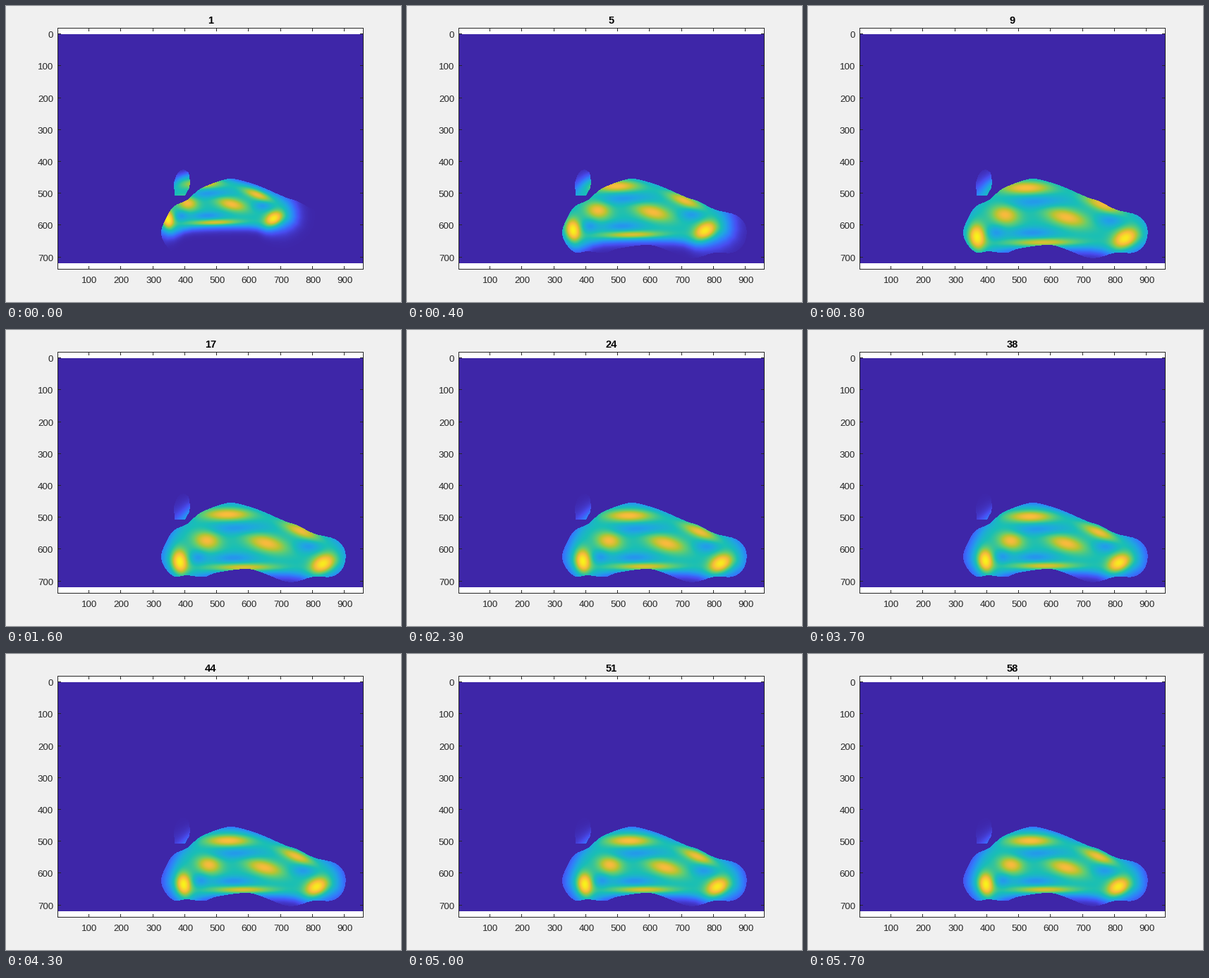
Write a matplotlib script that moves like this. It is 560 px wide and 420 px high and loops after 5800 ms.

```python
import numpy as np
import matplotlib.pyplot as plt
from matplotlib.animation import FuncAnimation
from matplotlib.colors import LinearSegmentedColormap
from matplotlib.path import Path

W, H, DPI = 560, 420, 100
FRAMES, INTERVAL = 58, 100
LEFT, RIGHT, TOP, BOTTOM = 73, 507, 31, 374
IMG_TOP, IMG_BOTTOM = 40, 365
SCALE = (RIGHT - LEFT) / 960
INK = "#262626"

STOPS = np.array([0, 8, 16, 24, 32, 40, 46, 52, 63]) / 63
COLORS = ["#3e26a8", "#484df0", "#327cfc", "#20a5e3", "#19bfb6",
          "#64cd6f", "#b9c431", "#f8ba3d", "#f9fb15"]
CMAP = LinearSegmentedColormap.from_list("blue_yellow", list(zip(STOPS, COLORS)))

# Template bumps: x, y, sigma x, sigma y, tilt, height
BUMPS = [(315, 265, 24, 6, 0, .35), (412, 287, 20, 6, 22, .34),
         (288, 299, 13, 9, 10, .33), (366, 303, 20, 8, 15, .33),
         (252, 327, 8, 12, -5, .50), (440, 331, 13, 9, -30, .49),
         (336, 335, 32, 4, 0, .36),
         (328, 283, 26, 6, 0, -.17), (276, 321, 8, 6, 0, -.15),
         (322, 322, 20, 5, 0, -.17), (421, 307, 12, 6, 0, -.16)]

# Pose as scale, tilt in degrees, centre x, centre y
REST = np.array([1, 0, 343.9, 306.7])
SLOW = np.array([.42, -1, 8, 0])
FAST = np.array([.62, .5, 49.5, 22])


def pose(t):
    """Quick approach with a small overshoot that settles slowly."""
    return REST + SLOW * np.exp(-t / 10) - FAST * np.exp(-(t / 4.7) ** 1.5)


def closed_curve(points, steps=4):
    """Catmull-Rom loop through the points."""
    p = np.array(points, float)
    before, after, later = (np.roll(p, k, axis=0) for k in (1, -1, -2))
    parts = [p + u / 2 * (after - before
                          + u * (2 * before - 5 * p + 4 * after - later)
                          + u * u * (3 * (p - after) + later - before))
             for u in np.arange(steps) / steps]
    return np.stack(parts, axis=1).reshape(-1, 2)


# Fixed silhouette, then the half-level contour of the soft template at rest
CAR = closed_curve([(220, 321), (225, 305), (237, 285), (257, 275), (276, 259),
                    (307, 247), (325, 245.5), (358, 255), (395, 271), (413, 277),
                    (437, 289), (467, 297), (481, 314), (478, 337), (462, 350),
                    (436, 350), (402, 358), (365, 345), (341, 339), (300, 344),
                    (280, 350.5), (256, 348), (239, 350), (225, 337)])
MIRROR = [(239, 268.5), (238, 251), (241, 241), (246, 234), (252, 232),
          (259, 236), (261, 249), (260, 258), (254, 268.5)]
BODY = closed_curve([(227, 327), (238, 290), (256, 268), (280, 250), (325, 246),
                     (375, 260), (425, 276), (468, 300), (474, 336), (435, 352),
                     (395, 345), (295, 345), (252, 355)])


def turn(x, y, degrees):
    c, s = np.cos(np.radians(degrees)), np.sin(np.radians(degrees))
    return c * x - s * y, s * x + c * y


def depth(x, y):
    """Signed distance to the body contour, positive inside."""
    best = np.full(x.shape, np.inf)
    for (px, py), (qx, qy) in zip(BODY, np.roll(BODY, -1, axis=0)):
        dx, dy = qx - px, qy - py
        u = np.clip(((x - px) * dx + (y - py) * dy) / (dx * dx + dy * dy), 0, 1)
        best = np.minimum(best, (x - px - u * dx) ** 2 + (y - py - u * dy) ** 2)
    inside = Path(BODY).contains_points(np.column_stack([x, y]))
    return np.where(inside, 1, -1) * np.sqrt(best)


def template(x, y):
    level = np.full(x.shape, .5)
    for bx, by, sx, sy, tilt, height in BUMPS:
        u, v = turn(x - bx, y - by, -tilt)
        level += height * np.exp(-.5 * ((u / sx) ** 2 + (v / sy) ** 2))
    soft = 4 + 3.5 * np.clip((np.abs(x - 345) - 65) / 50, 0, 1)
    return level / (1 + np.exp(-depth(x, y) / soft))


cols, rows = np.meshgrid(np.arange(LEFT, RIGHT) + .5, np.arange(IMG_TOP, IMG_BOTTOM) + .5)
pixels = np.column_stack([cols.ravel(), rows.ravel()])
mask = (Path(CAR).contains_points(pixels)
        | Path(MIRROR).contains_points(pixels)).reshape(cols.shape)
mx, my = cols[mask], rows[mask]


def field(n):
    scale, tilt, cx, cy = pose(n)
    x, y = turn((mx - cx) / scale, (my - cy) / scale, -tilt)
    out = np.zeros(cols.shape)
    out[mask] = template(x + REST[2], y + REST[3])
    return out


fig = plt.figure(figsize=(W / DPI, H / DPI), dpi=DPI, facecolor="#f0f0f0")
ax = fig.add_axes([0, 0, 1, 1])
ax.set_axis_off()
ax.add_patch(plt.Rectangle((LEFT, TOP), RIGHT - LEFT, BOTTOM - TOP,
                           fc="white", lw=0, zorder=0))
image = ax.imshow(field(0), cmap=CMAP, vmin=0, vmax=1, interpolation="nearest",
                  extent=(LEFT, RIGHT, IMG_BOTTOM, IMG_TOP), aspect="auto", zorder=1)
ax.set(xlim=(0, W), ylim=(H, 0))


def line(x0, y0, x1, y1):
    ax.plot([x0, x1], [y0, y1], color=INK, lw=72 / DPI, snap=False,
            solid_capstyle="butt", zorder=2)


def label(x, y, text, **kw):
    style = dict(family="Liberation Sans", size=9.6, color=INK, va="baseline")
    return ax.text(x, y, text, **{**style, **kw})


for y in (TOP + .5, BOTTOM - .5):
    line(LEFT, y, RIGHT, y)
for x in (LEFT + .5, RIGHT - .5):
    line(x, TOP, x, BOTTOM)

for v in range(100, 1000, 100):
    x = np.floor(72.8 + (v - .5) * SCALE) + .5
    line(x, TOP, x, TOP + 5)
    line(x, BOTTOM - 5, x, BOTTOM)
    label(x + .8, 393, str(v), ha="center")

for v in range(0, 800, 100):
    y = np.floor(39.9 + (v - .5) * SCALE) + .5
    line(LEFT, y, LEFT + 5, y)
    line(RIGHT - 5, y, RIGHT, y)
    label(67, y + 5.5, str(v), ha="right")

title = label(290, 25, "1", ha="center", size=10.56, weight="bold", color="black")


def update(n):
    image.set_data(field(n))
    title.set_text(str(n + 1))
    return image, title


anim = FuncAnimation(fig, update, frames=FRAMES, interval=INTERVAL,
                     repeat=True, repeat_delay=0, blit=False)
plt.show()
```
